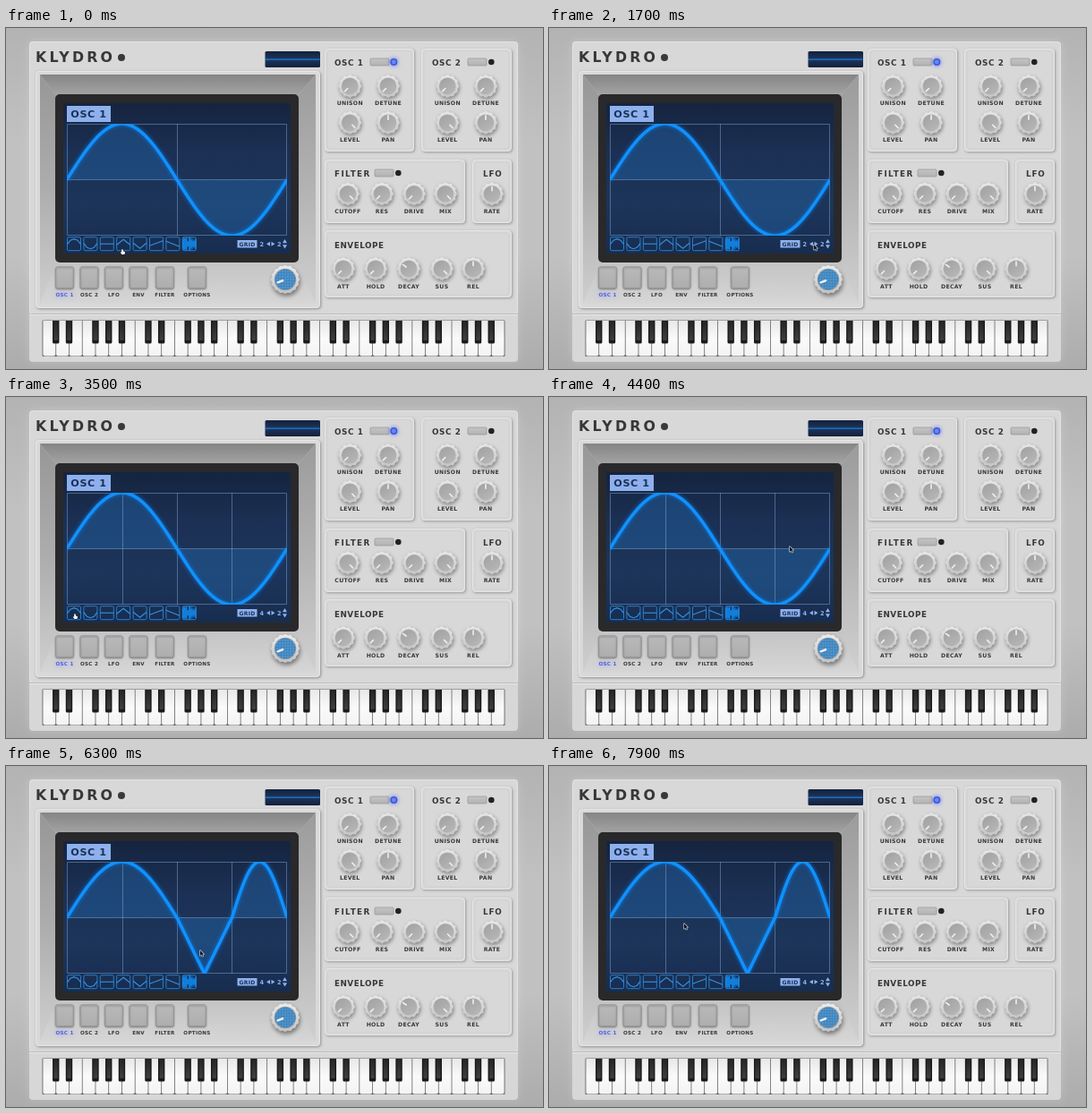
An HTML page with a canvas for the animation above (8000 ms loop, 600 by 381 pixels).

```html
<!DOCTYPE html>
<html lang="en">
<head>
<meta charset="utf-8">
<title>Synth</title>
<style>
html, body { margin: 0; width: 100%; height: 100%; overflow: hidden; background: #bdbdbd; }
canvas { display: block; width: 600px; height: 381px; }
</style>
</head>
<body>
<canvas id="stage"></canvas>
<script>
const W = 600, H = 381, LOOP = 8000, STEP = 100;
const INK = '#37373a', PALE = '#8eb0ec', NAVY = '#1a3159', BLUE = '#1191fb';
const dpr = window.devicePixelRatio || 1;
const stage = document.getElementById('stage');
const back = document.createElement('canvas');
let ctx;

function setup(canvas) {
  canvas.width = W * dpr;
  canvas.height = H * dpr;
  const c = canvas.getContext('2d');
  c.scale(dpr, dpr);
  return c;
}

function box(x, y, w, h, r, fill, stroke, line = 1) {
  ctx.beginPath();
  ctx.roundRect(x, y, w, h, r);
  if (fill) { ctx.fillStyle = fill; ctx.fill(); }
  if (stroke) { ctx.strokeStyle = stroke; ctx.lineWidth = line; ctx.stroke(); }
}

function disc(x, y, r, fill) {
  ctx.beginPath();
  ctx.arc(x, y, r, 0, Math.PI * 2);
  ctx.fillStyle = fill;
  ctx.fill();
}

function poly(points, fill, stroke, line = 1) {
  ctx.beginPath();
  points.forEach(([x, y]) => ctx.lineTo(x, y));
  if (fill) { ctx.closePath(); ctx.fillStyle = fill; ctx.fill(); }
  if (stroke) { ctx.strokeStyle = stroke; ctx.lineWidth = line; ctx.stroke(); }
}

function grad(x0, y0, x1, y1, ...colors) {
  const g = ctx.createLinearGradient(x0, y0, x1, y1);
  colors.forEach((c, i) => g.addColorStop(i / (colors.length - 1), c));
  return g;
}

function label(str, x, y, size, align = 'center', color = INK, gap = .3) {
  ctx.font = `bold ${size}px "DejaVu Sans", sans-serif`;
  ctx.letterSpacing = gap + 'px';
  ctx.textAlign = align;
  ctx.textBaseline = 'alphabetic';
  ctx.fillStyle = color;
  ctx.fillText(str, x, y);
  ctx.letterSpacing = '0px';
}

function shadow(color, blur, x = 0, y = 0) {
  ctx.shadowColor = color;
  ctx.shadowBlur = blur * dpr;
  ctx.shadowOffsetX = x * dpr;
  ctx.shadowOffsetY = y * dpr;
}

function noShadow() { shadow('transparent', 0); }

function panel(x, y, w, h) {
  shadow('rgba(0,0,0,.3)', 3, 1, 1);
  box(x, y, w, h, 4, '#d8d8d8');
  noShadow();
  box(x + .5, y + .5, w - 1, h - 1, 4, null, '#e6e6e6');
  box(x + 3, y + 3, w - 6, h - 6, 3, null, '#cdcdcd', .7);
}

function gear(x, y, r, teeth, fill) {
  ctx.beginPath();
  for (let i = 0; i <= 120; i++) {
    const a = i / 120 * Math.PI * 2, q = r + .55 * Math.cos(a * teeth);
    ctx.lineTo(x + q * Math.cos(a), y + q * Math.sin(a));
  }
  ctx.fillStyle = fill;
  ctx.fill();
}

// deg is measured clockwise from straight up
function needle(x, y, deg, from, to, color, width) {
  const a = deg * Math.PI / 180, s = Math.sin(a), c = -Math.cos(a);
  ctx.lineCap = 'round';
  poly([[x + s * from, y + c * from], [x + s * to, y + c * to]], null, color, width);
  ctx.lineCap = 'butt';
}

function knob(x, y, deg, text, labelY) {
  shadow('rgba(0,0,0,.4)', 4, 1, 2);
  gear(x, y, 12.3, 12, grad(x, y - 12, x, y + 12, '#e6e6e6', '#c6c6c6'));
  noShadow();
  disc(x, y, 9.4, grad(x - 6, y - 8, x + 6, y + 8, '#a3a3a3', '#b6b6b6'));
  needle(x, y, deg, 3.5, 8, '#f0f0f0', 1.6);
  label(text, x, labelY, 6.2);
}

function toggle(x, y, on) {
  box(x, y, 21, 8, 1, grad(0, y, 0, y + 8, '#c4c4c4', '#b2b2b2'), '#9a9a9a', .8);
  const cx = x + 26.3, cy = y + 4;
  if (on) {
    shadow('#5266ff', 5);
    disc(cx, cy, 4, '#4058d8');
    noShadow();
    disc(cx, cy, 2.4, '#6788f5');
  } else disc(cx, cy, 3.3, '#222');
}

function drawFrame() {
  ctx.fillStyle = grad(0, 0, 0, H, '#b3b3b3', '#c1c1c1', '#c1c1c1', '#acacac');
  ctx.fillRect(0, 0, W, H);

  shadow('rgba(255,255,255,.2)', 10);
  box(26, 15, 546, 358, 4, '#d7d7d7');
  noShadow();
  box(26.5, 15.5, 545, 304, 4, '#d8d8d8', '#e3e3e3');
  ctx.fillStyle = '#bcbcbc';
  ctx.fillRect(26, 319, 546, 1);
  ctx.fillStyle = '#e8e8e8';
  ctx.fillRect(26, 320, 546, 1);

  label('KLYDRO', 33, 38, 15.8, 'left', INK, 3.2);
  disc(129, 33, 4, '#39393b');

  // small scope
  box(289.5, 26, 61.5, 18, 1.5, grad(0, 26, 0, 44, '#14203a', '#1d365d', '#14203a'));
  ctx.fillStyle = '#1a7fe0';
  ctx.fillRect(290, 34.5, 60.5, 1.2);

  // bezel
  shadow('rgba(0,0,0,.35)', 3, 1, 1);
  box(33, 48, 318, 265, 4, '#d9d9d9');
  noShadow();
  box(33.5, 48.5, 317, 264, 4, null, '#e8e8e8');
  box(38, 52, 308, 256, 2, grad(0, 262, 0, 308, '#c4c4c4', '#d6d6d6'));
  poly([[38, 52], [346, 52], [325, 77], [57, 77]], grad(0, 52, 0, 76, '#858585', '#a5a5a5'));
  poly([[38, 52], [57, 77], [57, 261], [38, 308]], grad(0, 52, 0, 308, '#979797', '#adadad', '#cfcfcf'));
  poly([[346, 52], [325, 77], [325, 261], [346, 308]], grad(0, 52, 0, 308, '#9b9b9b', '#b3b3b3', '#d0d0d0'));
  box(55, 74, 272, 188, 5, '#29292b');

  // page buttons
  const pages = [['OSC 1', 65.5], ['OSC 2', 93], ['LFO', 120.5], ['ENV', 148], ['FILTER', 177.5], ['OPTIONS', 213.5]];
  pages.forEach(([name, x], i) => {
    shadow('rgba(0,0,0,.35)', 2, 0, 1);
    box(x - 10, 266.8, 20, 24, 2, grad(0, 267, 0, 291, '#b9b9b9', '#adadad'), '#969696', .8);
    noShadow();
    if (!i) shadow('#8b92ff', 5);
    label(name, x, 299.8, 5.6, 'center', i ? INK : '#5561dc');
    noShadow();
  });

  drawDial(312, 281);
  drawControls();
  drawKeys();
}

function drawDial(x, y) {
  shadow('rgba(0,0,0,.45)', 5, 1, 3);
  gear(x, y, 15.5, 16, grad(0, y - 16, 0, y + 16, '#ececec', '#c2c2c2'));
  noShadow();
  disc(x, y, 12.2, '#8c99a3');
  disc(x, y, 11.3, '#3f85bf');
  for (let dx = -9; dx <= 9; dx += 3)
    for (let dy = -9; dy <= 9; dy += 3)
      if (Math.hypot(dx, dy) < 11) disc(x + dx, y + dy, .8, 'rgba(170,210,240,.45)');
  needle(x, y, -112, 3, 9, '#eef4fa', 2.4);
}

function drawControls() {
  panel(356, 23, 100, 115);
  panel(464, 23, 101, 115);
  panel(356, 147, 157, 71);
  panel(521, 147, 44, 71);
  panel(356, 226, 209, 75);

  [[0, 'OSC 1', true], [109, 'OSC 2', false]].forEach(([dx, name, on]) => {
    label(name, 367 + dx, 41.5, 8.8, 'left', INK, .6);
    toggle(407 + dx, 34, on);
    knob(384.3 + dx, 65, -135, 'UNISON', 86.4);
    knob(427 + dx, 65, -135, 'DETUNE', 86.4);
    knob(384.3 + dx, 105.8, 135, 'LEVEL', 127.2);
    knob(427 + dx, 105.8, 0, 'PAN', 127.2);
  });

  label('FILTER', 367, 165.5, 8.8, 'left', INK, 1.4);
  toggle(412, 158, false);
  [[382, 135, 'CUTOFF'], [420, -135, 'RES'], [456, -135, 'DRIVE'], [491, 135, 'MIX']]
    .forEach(([x, deg, name]) => knob(x, 185.3, deg, name, 207.3));

  label('LFO', 533, 165.5, 8.8, 'left', INK, .8);
  knob(543, 185.3, 0, 'RATE', 207.3);

  label('ENVELOPE', 367, 245.5, 8.8, 'left', INK, .5);
  [[377, -135, 'ATT'], [413, -135, 'HOLD'], [450, -55, 'DECAY'], [487, 135, 'SUS'], [522, 0, 'REL']]
    .forEach(([x, deg, name]) => knob(x, 269, deg, name, 290.8));
}

// five octaves, C to B
function drawKeys() {
  const x0 = 41, count = 35, w = 516 / count;
  box(40.5, 326.5, 517, 40.5, 1, '#666');
  for (let i = 0; i < count; i++)
    box(x0 + i * w + .4, 327, w - .8, 39.5, [0, 0, 2, 2], grad(0, 327, 0, 367, '#e8e8e8', '#fafafa', '#f3f3f3'));
  for (let i = 1; i < count; i++) {
    if (i % 7 === 0 || i % 7 === 3) continue;
    const x = x0 + i * w;
    box(x - 3.7, 327, 7.4, 25.5, [0, 0, 1.5, 1.5], '#1a1a1a');
    box(x - 2.3, 327, 4.6, 22, 1, grad(0, 327, 0, 349, '#242424', '#3f3f3f'));
  }
}

const PLOT = { x: 68, y: 107, w: 246, h: 125 };
const LINE = 'rgba(139,175,218,.45)';

function wave(u, t) {
  if (u >= .75 && t >= 4700) return Math.sin((u - .75) * 4 * Math.PI);
  if (u >= .5 && u < .75 && t >= 6200) return Math.abs((u - .625) * 8) - 1;
  return Math.sin(u * 2 * Math.PI);
}

function drawWave(t) {
  const { x, y, w, h } = PLOT, mid = y + h / 2;
  const points = [];
  for (let i = 0; i <= 492; i++) points.push([x + i / 2, mid - wave(i / 492, t) * h / 2]);
  poly([[x, mid], ...points, [x + w, mid]], 'rgba(34,108,180,.38)');

  ctx.fillStyle = LINE;
  const cells = t >= 2100 ? 4 : 2;
  for (let i = 1; i < cells; i++) ctx.fillRect(Math.round(x + .5 + (w - 1) * i / cells), y, 1, h);
  ctx.fillRect(x, 169, w, 1);
  box(x + .5, y + .5, w - 1, h - 1, 0, null, LINE);

  ctx.save();
  ctx.beginPath();
  ctx.rect(x, y, w, h);
  ctx.clip();
  ctx.lineJoin = 'round';
  shadow('#0877e0', 4);
  poly(points, null, BLUE, 3.5);
  noShadow();
  ctx.restore();
}

const SHAPES = [
  [[0, 8], [3.5, 3.5], [7.5, 2], [11.5, 3.5], [15, 8]],
  [[0, 7], [3.5, 11.5], [7.5, 13], [11.5, 11.5], [15, 7]],
  [[0, 7.5], [15, 7.5]],
  [[0, 8.5], [7.5, 2.5], [15, 8.5]],
  [[0, 6.5], [7.5, 12.5], [15, 6.5]],
  [[0, 9.5], [15, 4]],
  [[0, 4.5], [15, 10.5]]
];

function drawTools(t) {
  for (let i = 0; i < 8; i++) {
    const x = 68.5 + i * 18.4, y = 233.7;
    box(x, y, 15, 15, 1.5, null, '#2b7dc6', 1);
    if (i < 7) poly(SHAPES[i].map(([a, b]) => [x + a, y + b]), null, '#3590e4', 1.1);
    else {
      ctx.fillStyle = BLUE;
      for (let k = 0; k < 15; k++) {
        const half = 5.2 + 2.2 * Math.sin(k * k * 1.7);
        ctx.fillRect(x + k, y + 7.5 - half, 1.1, half * 2);
      }
    }
  }
  box(258.5, 237, 22, 8.5, 0, PALE);
  label('GRID', 269.5, 243.6, 6.1, 'center', NAVY);
  label(t >= 2100 ? '4' : '2', 286, 243.8, 6.6, 'center', PALE);
  label('2', 305.5, 243.8, 6.6, 'center', PALE);
  poly([[291, 241.3], [295, 238.8], [295, 243.8]], PALE);
  poly([[300.5, 241.3], [296.5, 238.8], [296.5, 243.8]], PALE);
  poly([[311.5, 236], [309, 240.3], [314, 240.3]], PALE);
  poly([[311.5, 246.5], [309, 242.2], [314, 242.2]], PALE);
}

const PATH = [
  [0, 130, 247], [1600, 296, 242], [1750, 296, 242], [2000, 297, 240], [2600, 297, 240],
  [3350, 77, 242], [3600, 77, 242], [4400, 269, 167], [4650, 280, 172], [4800, 280, 172],
  [5400, 130, 247], [5650, 149, 243], [5800, 149, 243], [6200, 217, 206], [6400, 217, 206],
  [7800, 151, 176], [8000, 151, 176]
];

function cursorAt(t) {
  let i = 0;
  while (i < PATH.length - 2 && PATH[i + 1][0] <= t) i++;
  const [t0, x0, y0] = PATH[i], [t1, x1, y1] = PATH[i + 1];
  const k = (t - t0) / (t1 - t0), e = k * k * (3 - 2 * k);
  return [x0 + (x1 - x0) * e, y0 + (y1 - y0) * e];
}

const HAND = [[-1, 1], [0, .2], [1, 1], [1, 3], [3.3, 3.6], [3.5, 5], [2.6, 7], [-.6, 7], [-2.6, 4.4], [-1.8, 3.8], [-1, 4.5]];
const ARROW = [[0, 0], [0, 7], [1.6, 5.6], [2.7, 8], [3.8, 7.5], [2.8, 5.2], [4.8, 5]];

function drawCursor(t) {
  const [x, y] = cursorAt(t);
  const overIcons = y > 233 && y < 249 && x > 68 && x < 213;
  const overArrows = y > 236 && y < 241.5 && x > 290 && x < 301;
  const hand = overIcons || overArrows;
  ctx.save();
  ctx.translate(x, y);
  ctx.scale(.85, .85);
  ctx.lineJoin = 'round';
  ctx.beginPath();
  (hand ? HAND : ARROW).forEach(p => ctx.lineTo(...p));
  ctx.closePath();
  ctx.lineWidth = 1.3;
  ctx.strokeStyle = hand ? '#222b38' : '#dfe5ee';
  ctx.stroke();
  ctx.fillStyle = hand ? '#fff' : '#11151c';
  ctx.fill();
  ctx.restore();
}

function drawScreen(t) {
  box(64, 84, 254, 168, 2, grad(0, 84, 0, 252, '#15243f', '#1b3054', '#1d355a', '#172d50'));
  box(68, 87, 49, 18, 0, PALE);
  label('OSC 1', 92.5, 100.3, 11.2, 'center', NAVY, .6);
  drawWave(t);
  drawTools(t);
  drawCursor(t);
}

ctx = setup(back);
drawFrame();
ctx = setup(stage);

// the picture advances in steps of a tenth of a second
const start = performance.now();
function tick() {
  const now = (performance.now() - start) % LOOP;
  ctx.drawImage(back, 0, 0, W, H);
  drawScreen(now - now % STEP);
  requestAnimationFrame(tick);
}
tick();
</script>
</body>
</html>
```
